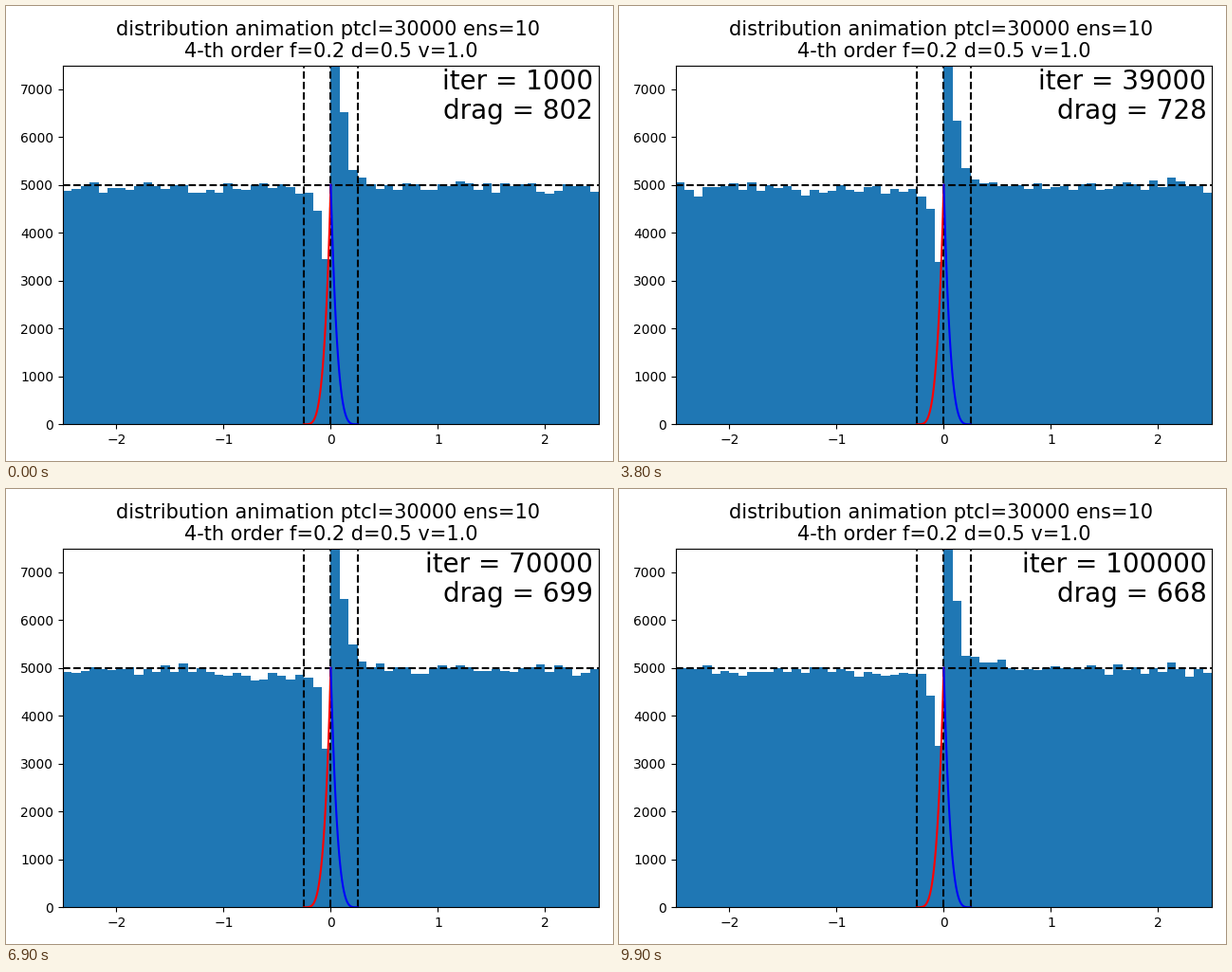
Write a matplotlib script that moves like this. It is 640 px wide and 480 px high and loops after 10000 ms.

```python
import numpy as np
import matplotlib.pyplot as plt
from matplotlib.animation import FuncAnimation

FRAMES, INTERVAL = 100, 100
BINS, HALF, LEVEL, REACH = 60, 2.5, 5000, 0.25

plt.rcParams["font.family"] = "DejaVu Sans"


def mean_counts(x):
    """Expected particle count per bin: flat, with a wake around zero."""
    left = 4950 - 190 * np.exp(-np.abs(x) / 0.6)
    right = 4975 + 450 * np.exp(-np.abs(x) / 0.25)
    mean = np.where(x < 0, left, right)
    mid = BINS // 2
    mean[mid - 2:mid + 3] = [4510, 3390, 8700, 6410, 5365]
    return mean


def drag(step):
    knots = [1, 16, 39, 48, 62, 78, 100]
    values = [802, 756, 728, 712, 700, 698, 668]
    return round(np.interp(step, knots, values))


edges = np.linspace(-HALF, HALF, BINS + 1)
width = edges[1] - edges[0]
counts = np.random.default_rng(12).poisson(
    mean_counts(edges[:-1] + width / 2), (FRAMES, BINS))

fig, ax = plt.subplots(figsize=(6.4, 4.8), dpi=100)
ax.set_xlim(-HALF, HALF)
ax.set_ylim(0, 7500)
ax.set_title("distribution animation ptcl=30000 ens=10 \n"
             "4-th order f=0.2 d=0.5 v=1.0", fontsize=15)

bars = ax.bar(edges[:-1], counts[0], width, align="edge", color="C0")
for x in (-REACH, 0, REACH):
    ax.axvline(x, color="k", ls="--")
ax.axhline(LEVEL, color="k", ls="--")

r = np.linspace(0, REACH, 100)
force = LEVEL * (1 - r / REACH) ** 4
ax.plot(-r, force, "r")
ax.plot(r, force, "b")


def corner_label(y):
    return ax.text(0.99, y, "", fontsize=20, ha="right", va="top",
                   transform=ax.transAxes)


iter_label = corner_label(0.99)
drag_label = corner_label(0.91)
fig.tight_layout()


def update(i):
    for bar, n in zip(bars, counts[i]):
        bar.set_height(n)
    step = i + 1
    iter_label.set_text(f"iter = {step * 1000}")
    drag_label.set_text(f"drag = {drag(step)}")
    return [*bars, iter_label, drag_label]


anim = FuncAnimation(fig, update, frames=FRAMES, interval=INTERVAL,
                     repeat=True, repeat_delay=0)
plt.show()
```
